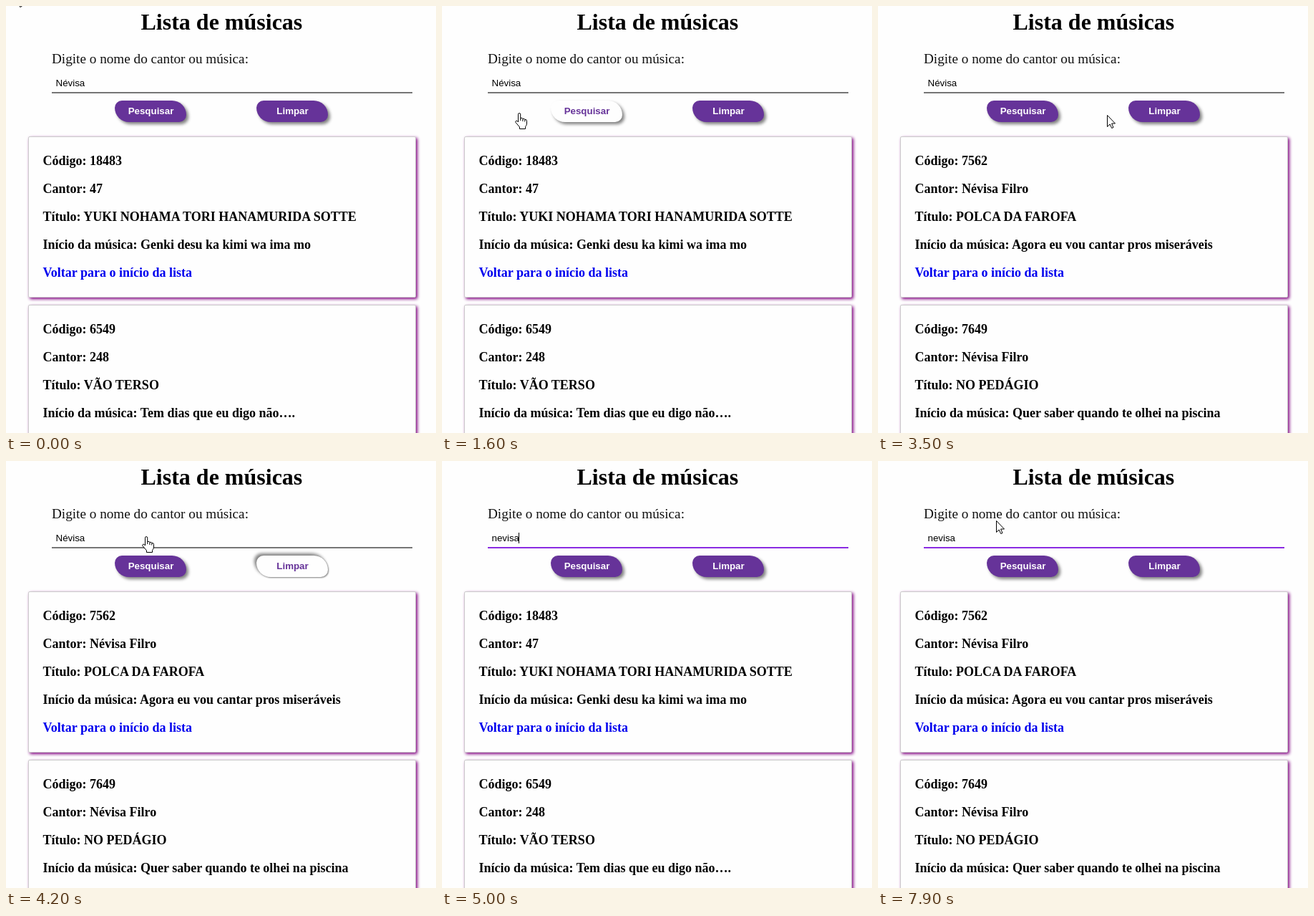
Write an HTML page that moves like this. It is 601x596 px and loops after 8000 ms.

```html
<!DOCTYPE html>
<html lang="pt-BR">
<head>
<meta charset="utf-8">
<title>Lista de músicas</title>
<style>
  html, body { margin: 0; width: 100%; height: 100%; overflow: hidden; background: #fefefe; }
  body { position: relative; color: #000; font-family: "Liberation Serif", "Times New Roman", serif; }
  h1, .at { position: absolute; margin: 0; white-space: nowrap; }
  .anim, .anim * { animation-duration: 8s; animation-timing-function: step-end; animation-iteration-count: infinite; }

  h1 { left: 188.5px; top: 4px; font-size: 32px; line-height: 36px; }
  .label { left: 64px; top: 63px; font-size: 19.2px; line-height: 21px; color: #111; }

  /* search field */
  .field { left: 64px; top: 100px; width: 504px; height: 20px; border-bottom: 2px solid #767676;
           font: 13.333px/15px "Liberation Sans", Arial, sans-serif; animation-name: focus; }
  .field span { position: absolute; left: 5.5px; top: 0; }
  .first { animation-name: first; }
  .second { animation-name: second; }
  .caret { position: absolute; left: 0; top: 0; width: 1px; height: 15px; background: #000; animation-name: caret; }
  @keyframes focus { 0% { border-color: #767676 } 56.25%, 100% { border-color: #8a2be2 } }
  @keyframes first { 0% { opacity: 1 } 56.25%, 100% { opacity: 0 } }
  @keyframes second { 0% { opacity: 0 } 62.5%, 100% { opacity: 1 } }
  @keyframes caret {
    0% { opacity: 0; transform: translateX(6px) }
    56.25% { opacity: 1; transform: translateX(6px) }
    62.5% { opacity: 1; transform: translateX(43px) }
    72.5%, 85%, 97.5%, 100% { opacity: 0; transform: translateX(43px) }
    78.75%, 91.25% { opacity: 1; transform: translateX(43px) }
  }

  /* buttons */
  .btn { top: 132px; width: 100px; height: 23px; padding-top: 7px; border-radius: 10px 20px; text-align: center;
         font: bold 13.333px/15px "Liberation Sans", Arial, sans-serif; text-indent: 1px;
         color: #fff; background: #639; box-shadow: 3px 3px 4px #808080; }
  .search { left: 152px; animation-name: search; }
  .clear { left: 350px; animation-name: clear; }
  @keyframes search {
    0%, 35%, 100% { color: #fff; background: #639 }
    12.5% { color: #639; background: #fefefe }
  }
  @keyframes clear {
    0%, 56.25%, 100% { color: #fff; background: #639; box-shadow: 3px 3px 4px #808080 }
    45% { color: #639; background: #fefefe; box-shadow: 3px 3px 4px #808080 }
    48.75% { color: #639; background: #fefefe; box-shadow: -3px -3px 4px #808080, 1px 1px 2px #808080 }
  }

  /* result cards */
  .card { left: 31px; width: 540px; height: 223px; background: #fefefe; border: 1px solid #ccc;
          border-radius: 2px; box-shadow: 2px 2px 4px purple; }
  .list { left: 51.5px; top: 206px; font: bold 18px/20px "Liberation Serif", "Times New Roman", serif; }
  .list p, .list a { display: block; margin: 0 0 19px; }
  .list a { color: #00e; margin-bottom: 59px; }
  .all { animation-name: all; }
  .found { animation-name: found; }
  @keyframes all { 0%, 56.25% { opacity: 1 } 35%, 67.5%, 100% { opacity: 0 } }
  @keyframes found { 0%, 56.25% { opacity: 0 } 35%, 67.5%, 100% { opacity: 1 } }

  /* pointer */
  .pointer { left: 0; top: 0; width: 18px; height: 24px; animation-name: move; }
  .pointer svg { position: absolute; left: 0; top: 0; overflow: visible; fill: #fff; stroke: #000; stroke-linejoin: round; }
  .arrow { animation-name: arrow; }
  .hand { animation-name: hand; }
  @keyframes move {
    0% { transform: translate(13px, -17px) }
    6.25% { transform: translate(130px, 8px) }
    7.5% { transform: translate(240px, 30px) }
    8.75% { transform: translate(310px, 75px) }
    10% { transform: translate(325px, 112px) }
    11.25% { transform: translate(262px, 138px) }
    12.5% { transform: translate(200px, 144px) }
    15% { transform: translate(199px, 143px) }
    17.5% { transform: translate(185px, 146px) }
    18.75% { transform: translate(140px, 149px) }
    20% { transform: translate(102px, 149px) }
    35% { transform: translate(107px, 148px) }
    41.25% { transform: translate(160px, 150px) }
    42.5% { transform: translate(240px, 152px) }
    43.75% { transform: translate(320px, 152px) }
    45% { transform: translate(370px, 150px) }
    46.25% { transform: translate(396px, 149px) }
    51.25% { transform: translate(310px, 138px) }
    52.5% { transform: translate(190px, 105px) }
    56.25% { transform: translate(58px, 13px) }
    62.5%, 98.75%, 100% { transform: translate(165px, 83px) }
  }
  @keyframes arrow {
    0%, 35%, 56.25%, 98.75%, 100% { opacity: 1 }
    12.5%, 45%, 62.5% { opacity: 0 }
  }
  @keyframes hand {
    0%, 35%, 56.25%, 100% { opacity: 0 }
    12.5%, 45% { opacity: 1 }
  }
</style>
</head>
<body class="anim">
  <h1>Lista de músicas</h1>
  <p class="at label">Digite o nome do cantor ou música:</p>

  <div class="at field">
    <span class="first">Névisa</span>
    <span class="second">nevisa</span>
    <i class="caret"></i>
  </div>

  <div class="at btn search">Pesquisar</div>
  <div class="at btn clear">Limpar</div>

  <div class="at card" style="top:182px"></div>
  <div class="at card" style="top:417px"></div>

  <div class="at list all">
    <p>Código: 18483</p>
    <p>Cantor: 47</p>
    <p>Título: YUKI NOHAMA TORI HANAMURIDA SOTTE</p>
    <p>Início da música: Genki desu ka kimi wa ima mo</p>
    <a>Voltar para o início da lista</a>
    <p>Código: 6549</p>
    <p>Cantor: 248</p>
    <p>Título: VÃO TERSO</p>
    <p>Início da música: Tem dias que eu digo não….</p>
  </div>

  <div class="at list found">
    <p>Código: 7562</p>
    <p>Cantor: Névisa Filro</p>
    <p>Título: POLCA DA FAROFA</p>
    <p>Início da música: Agora eu vou cantar pros miseráveis</p>
    <a>Voltar para o início da lista</a>
    <p>Código: 7649</p>
    <p>Cantor: Névisa Filro</p>
    <p>Título: NO PEDÁGIO</p>
    <p>Início da música: Quer saber quando te olhei na piscina</p>
  </div>

  <div class="at pointer">
    <svg class="arrow" width="12" height="19">
      <path d="M.5 .5V16.5L4.2 13L6.7 18.5L9 17.5L6.6 12H11.5Z"/>
    </svg>
    <svg class="hand" width="18" height="24">
      <path d="M4.5 13V2.2a1.6 1.6 0 0 1 3.2 0V7.5q3-.9 3.2 1q2.6-.9 2.9 1q2.6-.5 2.7 1.8V15q0 2.5-2 4.5V22.5H6.5V20L1 13.5q-.8-1.8 .8-2.4q1.2-.3 2.7 1.9z"/>
      <path d="M7.7 7.5V11M10.9 8.5V12M13.8 9.5V12.5"/>
    </svg>
  </div>
</body>
</html>
```
